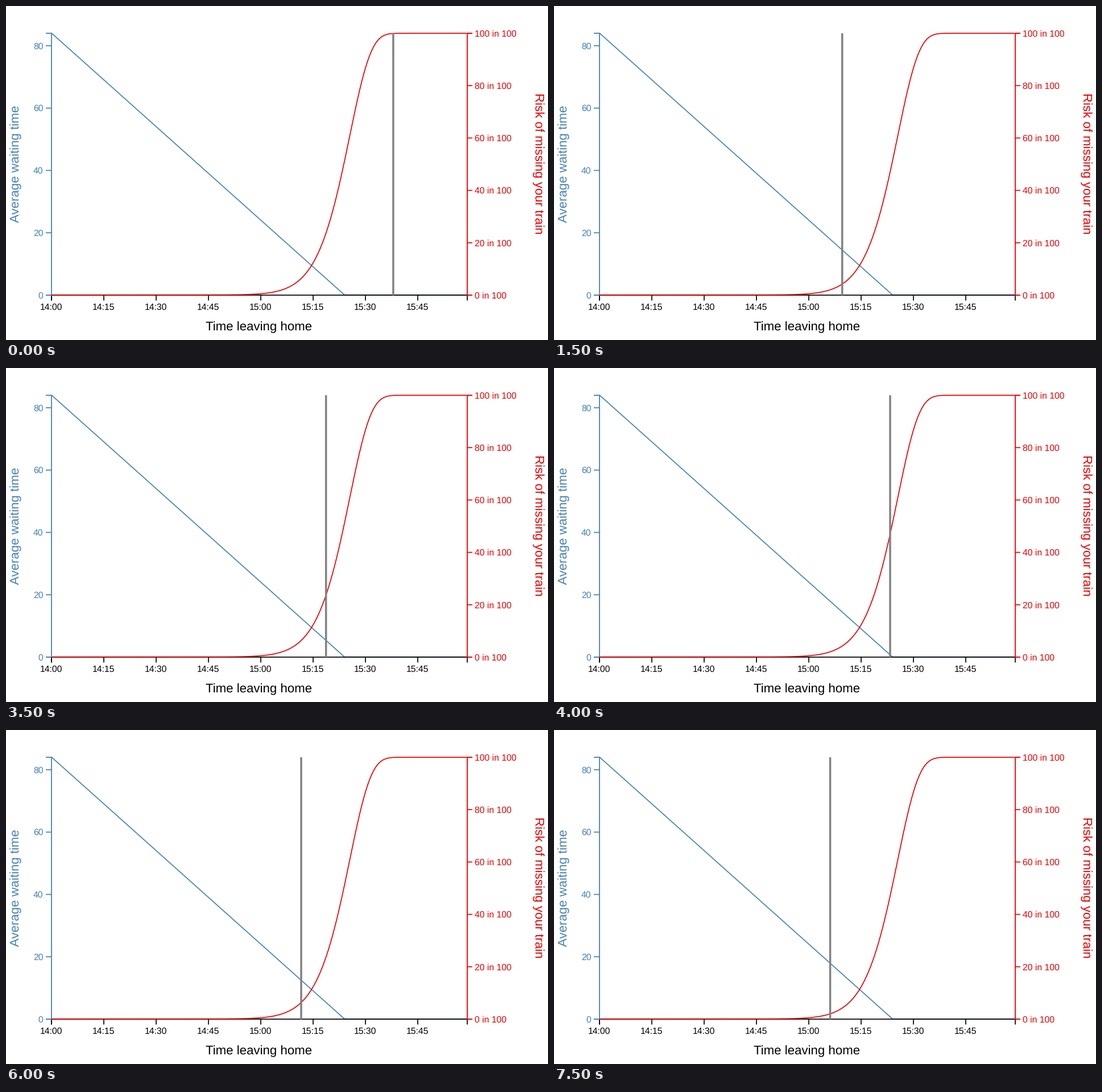
Animation of 953x588 px, one loop 8 s. Source, as a matplotlib script:

```python
import matplotlib.pyplot as plt
import numpy as np
from matplotlib.animation import FuncAnimation

W, H, DPI = 953, 588, 72  # at 72 dpi one point is one pixel
BLUE, RED, GRAY = "#4682b4", "#e80000", "#828282"
LEFT, RIGHT, TOP, BOTTOM = 80, 811, 48, 509
PX_PER_MIN = 92 / 15
LAST_MIN, TRAIN_MIN = 119, 84

plt.rcParams.update({
    "font.family": "Liberation Sans",
    "text.hinting": "none",
    "path.snap": False,
    "toolbar": "None",
})

fig = plt.figure(figsize=((W + 0.01) / DPI, (H + 0.01) / DPI), dpi=DPI,
                 facecolor="white")
ax = fig.add_axes([0, 0, 1, 1])
ax.set_xlim(0, W)
ax.set_ylim(H, 0)
ax.axis("off")


def stroke(xs, ys, color, width=1.7, z=2):
    return ax.plot(xs, ys, color=color, lw=width, zorder=z,
                   solid_capstyle="butt", solid_joinstyle="miter")[0]


def label(x, y, text, color, size=15.8, ha="center", angle=0):
    ax.text(x, y, text, color=color, fontsize=size, ha=ha, va="baseline",
            rotation=angle, rotation_mode="anchor")


def time_x(minute):
    return LEFT + minute * PX_PER_MIN


def height_y(share):
    return BOTTOM - share * (BOTTOM - TOP)


# Time axis
stroke([LEFT, LEFT, RIGHT, RIGHT], [518.5, BOTTOM, BOTTOM, 518.5], "black")
for minute in range(0, 120, 15):
    x = time_x(minute)
    stroke([x, x], [BOTTOM, 518.5], "black")
    label(x, 534.4, f"{14 + minute // 60}:{minute % 60:02d}", "black")
label(444.5, 571, "Time leaving home", "black", 22.2)

# Waiting time axis
stroke([70, LEFT, LEFT, 70], [TOP, TOP, BOTTOM, BOTTOM], BLUE, 1.8)
for value in range(0, 100, 20):
    y = height_y(value / TRAIN_MIN)
    stroke([70, LEFT], [y, y], BLUE)
    label(65.5, y + 5.6, str(value), BLUE, ha="right")
label(23, 277.6, "Average waiting time", BLUE, 22.2, angle=90)

# Risk axis
stroke([820, RIGHT, RIGHT, 820], [TOP, TOP, BOTTOM, BOTTOM], RED, 1.8)
for value in range(0, 101, 20):
    y = height_y(value / 100)
    stroke([RIGHT, 820], [y, y], RED)
    label(824, y + 5.6, f"{value} in 100", RED, ha="left")
label(930, 277.6, "Risk of missing your train", RED, 22.3, angle=270)

# Curves: the wait shrinks minute by minute, the risk is a Weibull distribution
minutes = np.linspace(0, LAST_MIN, 800)
wait = np.maximum(1 - minutes / TRAIN_MIN, 0)
risk = 1 - np.exp(-(minutes / 85.88) ** 15)
xs = np.minimum(time_x(minutes), RIGHT)
stroke(xs, height_y(wait) - 0.3, BLUE, z=1)
stroke(xs, height_y(risk) - 0.3 * (1 - risk), RED, z=3)

# Cursor: sweeps to and fro between turning points, one jump per half second
STEPS = 16
TURNS = [(0, 680.9), (1, 542.3), (4, 489), (5, 506), (8, 591),
         (9, 570), (12, 519), (14, 489), (15, 485.6)]
cursor = stroke([LEFT, LEFT], [TOP, BOTTOM], GRAY, 3.5, z=5)


def update(step):
    x = np.interp(step, *zip(*TURNS))
    cursor.set_xdata([x, x])
    return [cursor]


anim = FuncAnimation(fig, update, frames=STEPS, interval=500,
                     repeat=True, repeat_delay=0, blit=False)
plt.show()
```
